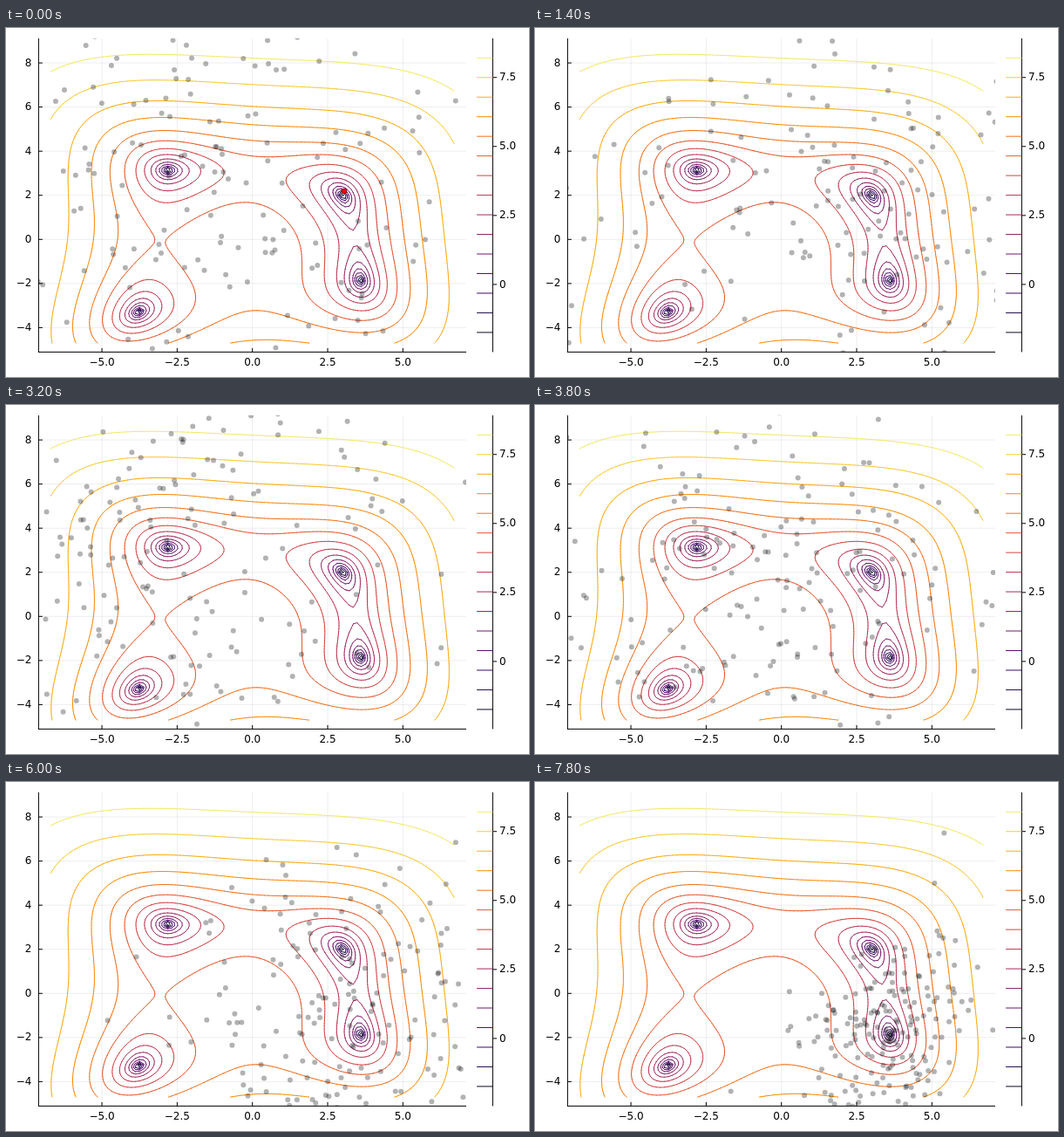
Write an HTML page with a canvas that moves like this. It is 600x400 px and loops after 8 s.

```html
<!DOCTYPE html>
<html lang="en">
<head>
<meta charset="utf-8">
<title>Sampling search on a contour plot</title>
<style>
  html, body { margin: 0; width: 100%; height: 100%; overflow: hidden; background: #fff; }
  canvas { display: block; }
</style>
</head>
<body>
<canvas id="stage" width="600" height="400"></canvas>
<script>
const LOOP = 8000, STEP = 200, SAMPLES = 200;
const PLOT = { left: 37.4, top: 11.8, right: 528, bottom: 371.4 };
const Z_MIN = -2.45, Z_MAX = 8.92, LEVELS = 15;
const COLORS = ['#0b0724', '#210c4a', '#3d0965', '#57106e', '#71196e', '#8a226a', '#a32c61', '#bc3754',
  '#d24644', '#e45a31', '#f1731d', '#f98e09', '#fcac11', '#f9cb35', '#f2ea69'];

const px = x => 282.7 + 34.53 * x;
const py = y => 242.3 - 25.28 * y;
const barY = z => PLOT.bottom - (z - Z_MIN) / (Z_MAX - Z_MIN) * (PLOT.bottom - PLOT.top);
const height = (x, y) => Math.log((x * x + y - 11) ** 2 + (x + y * y - 7) ** 2 + 1e-9);

// Search distribution in pixels: step, mean x, mean y, spread x, spread y, correlation
const KEYS = [
  [0, 235, 195, 180, 138, 0],
  [7, 345, 190, 185, 130, 0],
  [16, 190, 155, 150, 135, 0],
  [23, 410, 262, 135, 100, 0],
  [30, 412, 258, 120, 90, 0],
  [34, 405, 268, 88, 76, -0.1],
  [39, 404, 284, 54, 57, -0.25]
];

function line(ctx, x1, y1, x2, y2) {
  ctx.beginPath();
  ctx.moveTo(x1, y1);
  ctx.lineTo(x2, y2);
  ctx.stroke();
}

function strokeContours(ctx) {
  const n = 100, size = 13.4, h = size / n, x0 = -6.7, y0 = -4.7;
  const grid = Array.from({ length: n + 1 }, (_, j) =>
    Array.from({ length: n + 1 }, (_, i) => height(x0 + i * h, y0 + j * h)));
  ctx.lineCap = 'round';
  COLORS.forEach((color, k) => {
    const level = Z_MIN + (k + 1) * (Z_MAX - Z_MIN) / (LEVELS + 1);
    ctx.strokeStyle = color;
    ctx.beginPath();
    for (let j = 0; j < n; j++) {
      for (let i = 0; i < n; i++) {
        const corners = [[i, j], [i + 1, j], [i + 1, j + 1], [i, j + 1]];
        const hits = [];
        corners.forEach(([ai, aj], c) => {
          const [bi, bj] = corners[(c + 1) % 4];
          const a = grid[aj][ai], b = grid[bj][bi];
          if ((a < level) === (b < level)) return;
          const t = (level - a) / (b - a);
          hits.push([px(x0 + (ai + (bi - ai) * t) * h), py(y0 + (aj + (bj - aj) * t) * h)]);
        });
        for (let m = 0; m < hits.length; m += 2) {
          ctx.moveTo(...hits[m]);
          ctx.lineTo(...hits[m + 1]);
        }
      }
    }
    ctx.stroke();
    line(ctx, 540.5, barY(level), 558, barY(level));
  });
  ctx.lineCap = 'butt';
}

function drawAxes(ctx) {
  const { left, top, right, bottom } = PLOT;
  const xTicks = [-5, -2.5, 0, 2.5, 5], yTicks = [-4, -2, 0, 2, 4, 6, 8];
  const label = (text, x, y, align) => {
    ctx.textAlign = align;
    ctx.fillText(String(text).replace('-', '\u2212'), x, y);
  };
  ctx.font = '12px "DejaVu Sans", sans-serif';
  ctx.textBaseline = 'middle';
  ctx.fillStyle = '#000';

  ctx.strokeStyle = 'rgba(0,0,0,0.07)';
  xTicks.forEach(x => line(ctx, px(x), top, px(x), bottom));
  yTicks.forEach(y => line(ctx, left, py(y), right, py(y)));

  ctx.strokeStyle = '#000';
  line(ctx, left, top, left, bottom);
  line(ctx, left - 0.5, bottom, right, bottom);
  line(ctx, 558.4, top, 558.4, bottom);
  xTicks.forEach(x => {
    line(ctx, px(x), bottom, px(x), bottom - 4.5);
    label(x.toFixed(1), px(x), 384, 'center');
  });
  yTicks.forEach(y => {
    line(ctx, left, py(y), left + 4.5, py(y));
    label(y, 29.5, py(y) + 0.5, 'right');
  });
  [0, 2.5, 5, 7.5].forEach(z => {
    line(ctx, 558.4, barY(z), 563, barY(z));
    label(z ? z.toFixed(1) : 0, 566, barY(z) + 0.5, 'left');
  });
}

function makeBackground() {
  const canvas = document.createElement('canvas');
  canvas.width = 600;
  canvas.height = 400;
  const ctx = canvas.getContext('2d');
  ctx.fillStyle = '#fff';
  ctx.fillRect(0, 0, 600, 400);
  drawAxes(ctx);
  strokeContours(ctx);
  return canvas;
}

function seededRandom(seed) {
  return () => {
    seed = (seed + 0x6D2B79F5) | 0;
    let t = Math.imul(seed ^ (seed >>> 15), 1 | seed);
    t = (t + Math.imul(t ^ (t >>> 7), 61 | t)) ^ t;
    return ((t ^ (t >>> 14)) >>> 0) / 4294967296;
  };
}

function distributionAt(step) {
  const next = Math.max(1, KEYS.findIndex(key => key[0] >= step));
  const a = KEYS[next - 1], b = KEYS[next];
  const t = (step - a[0]) / (b[0] - a[0]);
  return a.map((value, i) => value + (b[i] - value) * t).slice(1);
}

function dot(ctx, x, y) {
  ctx.beginPath();
  ctx.arc(x, y, 3, 0, 2 * Math.PI);
  ctx.fill();
}

function drawSamples(ctx, step) {
  const [mx, my, sx, sy, corr] = distributionAt(step);
  const random = seededRandom(step * 7919 + 17);
  ctx.save();
  ctx.beginPath();
  ctx.rect(PLOT.left, PLOT.top, PLOT.right - PLOT.left, PLOT.bottom - PLOT.top);
  ctx.clip();
  ctx.fillStyle = 'rgba(0,0,0,0.3)';
  for (let i = 0; i < SAMPLES; i++) {
    const radius = Math.sqrt(-2 * Math.log(1 - random()));
    const angle = 2 * Math.PI * random();
    const u = radius * Math.cos(angle), v = radius * Math.sin(angle);
    dot(ctx, mx + sx * u, my + sy * (corr * u + Math.sqrt(1 - corr * corr) * v));
  }
  if (step === 0) {
    ctx.fillStyle = '#f00';
    ctx.strokeStyle = '#500';
    ctx.lineWidth = 0.7;
    dot(ctx, 388, 187);
    ctx.stroke();
  }
  ctx.restore();
}

const ctx = document.getElementById('stage').getContext('2d');
const background = makeBackground();
let shown = -1;

function render() {
  const step = Math.floor((performance.now() % LOOP) / STEP);
  if (step !== shown) {
    shown = step;
    ctx.drawImage(background, 0, 0);
    drawSamples(ctx, step);
  }
  requestAnimationFrame(render);
}
render();
</script>
</body>
</html>
```
